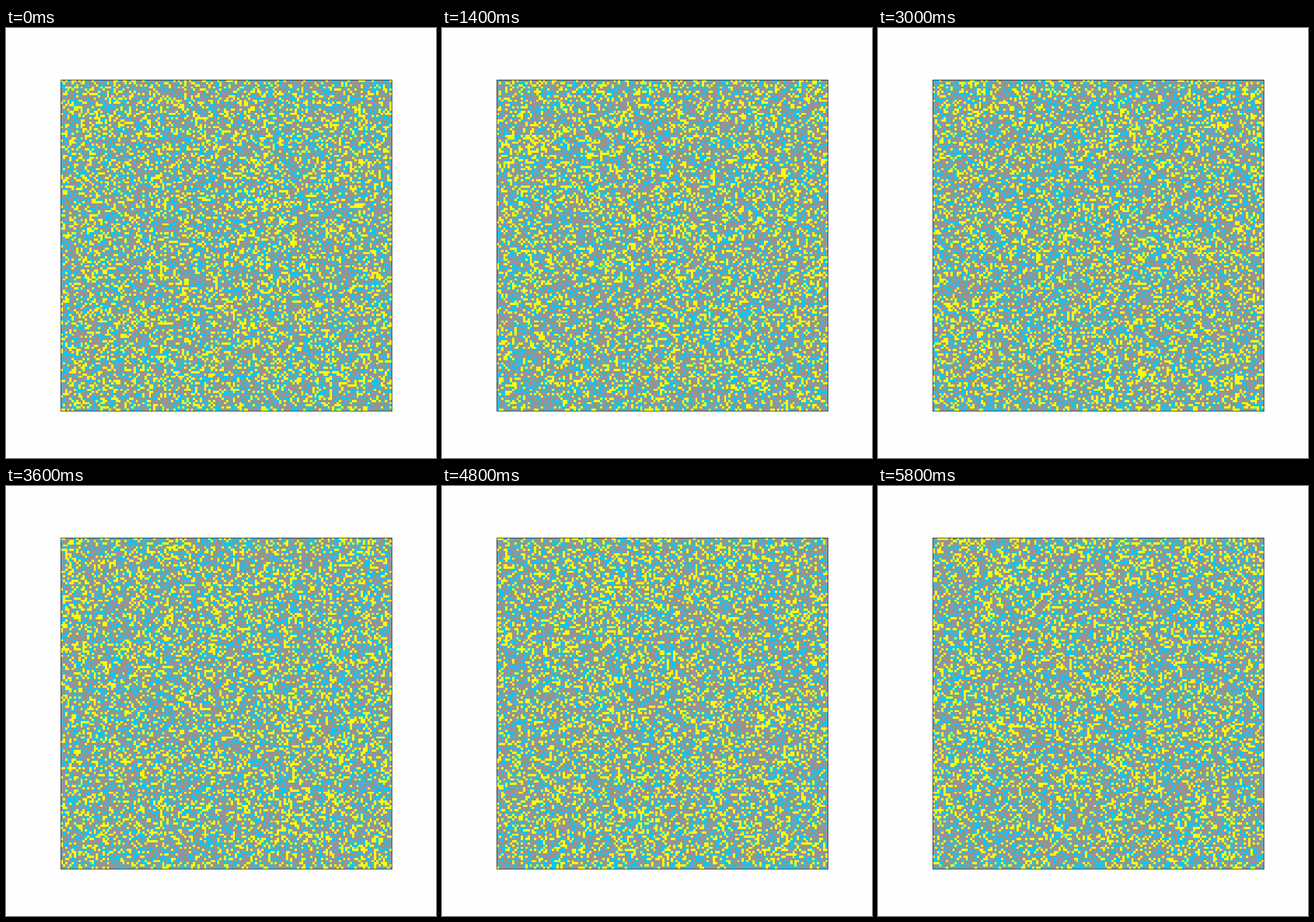
Animation of 748 by 748 pixels, one loop 6 s. Source, as a matplotlib script:

```python
import numpy as np
import matplotlib.pyplot as plt
from matplotlib.animation import FuncAnimation
from matplotlib.colors import ListedColormap

SIZE = 748
DPI = 72
CELLS = 150
FRAMES = 30
STEP_MS = 200
PAPER = "#fefefe"
COLORS = ["#949494", "#00c8ff", "#ffff00"]
SHARES = [0.54, 0.23, 0.23]


def scatter_cells(frame):
    """Fresh random lattice per step; the first one is held for two steps."""
    rng = np.random.default_rng(100 + max(frame, 1))
    return rng.choice(len(COLORS), size=(CELLS, CELLS), p=SHARES)


fig, ax = plt.subplots(figsize=(SIZE / DPI, SIZE / DPI), dpi=DPI,
                       facecolor=PAPER)
ax.set_xticks([])
ax.set_yticks([])
grid = ax.imshow(scatter_cells(0), cmap=ListedColormap(COLORS),
                 vmin=0, vmax=2, interpolation="nearest")


def update(frame):
    grid.set_data(scatter_cells(frame))
    return [grid]


anim = FuncAnimation(fig, update, frames=FRAMES, interval=STEP_MS,
                     repeat=True, repeat_delay=0, blit=False)
plt.show()
```
